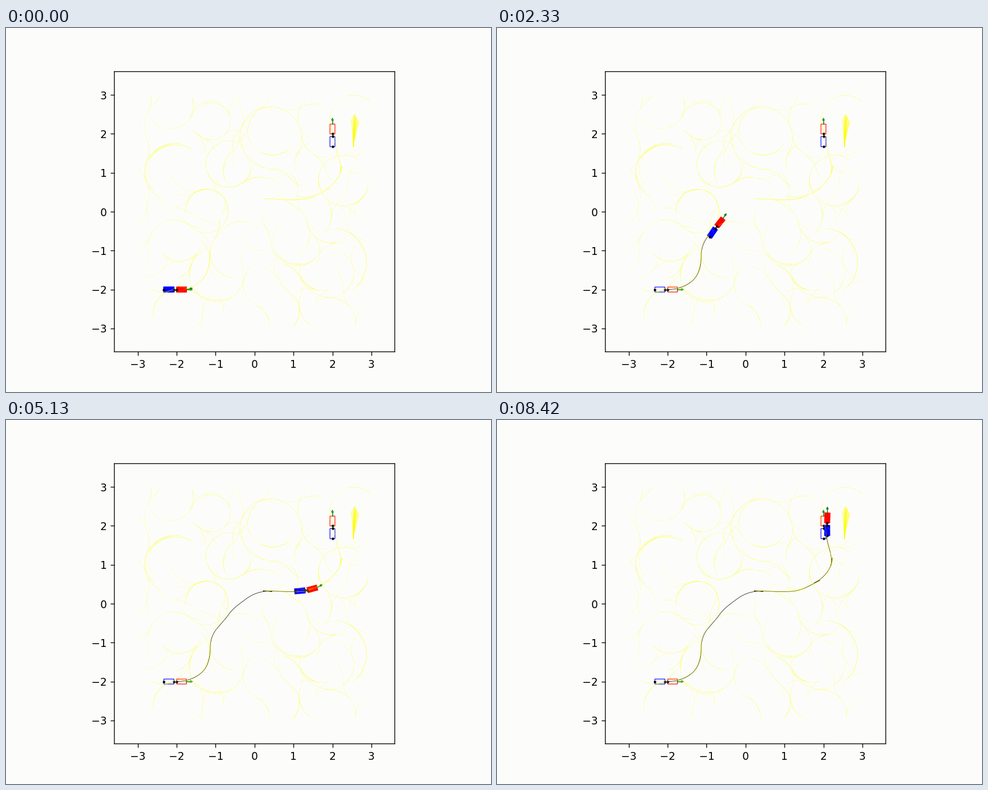
A matplotlib script that plays this animation: 864 by 648 pixels, repeating every 8.46 s.

```python
import numpy as np
import matplotlib.pyplot as plt
from matplotlib.animation import FuncAnimation
from matplotlib.collections import LineCollection

FRAMES, LOOP_MS = 203, 8460
SUB = 8                      # simulation steps per frame
CAR, GAP, TRAILER, HALF = 0.25, 0.07, 0.33, 0.064
BG = "#fcfdfa"

# Rear axle poses along the drive: x, y, heading in degrees
TURN_IN, TURN_OUT = (2.193, 0.985, 78), (2.225, 1.172, 90)
POSES = [
    (-2, -2, 0), (-1.325, -1.735, 47), (-1.137, -1.122, 90),
    (-0.978, -0.653, 50), (-0.661, -0.271, 55), (-0.214, 0.126, 37),
    (0.45, 0.314, -8), (0.22, 0.331, -1), (1.215, 0.321, 5),
    (1.908, 0.602, 27), (1.763, 0.537, 24), TURN_OUT, TURN_IN,
    TURN_OUT, TURN_IN, (2.11, 1.562, 105), (2.095, 2.081, 88),
]


def hermite(a, b, n=400):
    """Curve between two poses, plus its gear (1 forward, -1 reverse)."""
    p, q = np.array(a[:2]), np.array(b[:2])
    ta, tb = (np.array([np.cos(h), np.sin(h)])
              for h in np.radians([a[2], b[2]]))
    gear = 1 if (q - p) @ ta > 0 else -1
    size = gear * np.hypot(*(q - p))
    u = np.linspace(0, 1, n)[:, None]
    c = ((1 + 2 * u) * (1 - u) ** 2 * p + u * (1 - u) ** 2 * size * ta
         + u * u * (3 - 2 * u) * q + u * u * (u - 1) * size * tb)
    return c, gear


def drive():
    """Constant-speed run through all poses, towing the trailer."""
    pts, head, step = [], [], []
    for a, b in zip(POSES, POSES[1:]):
        c, gear = hermite(a, b)
        g = gear * np.gradient(c, axis=0)
        pts.append(c)
        head.append(np.arctan2(g[:, 1], g[:, 0]))
        step.append(gear * np.r_[0, np.hypot(*np.diff(c, axis=0).T)])
    pts, head, step = map(np.concatenate, (pts, head, step))
    dist = np.cumsum(np.abs(step))
    t = np.linspace(0, dist[-1], (FRAMES - 1) * SUB + 1)

    pos = np.column_stack([np.interp(t, dist, pts[:, k]) for k in (0, 1)])
    head = np.interp(t, dist, np.unwrap(head))
    run = np.diff(np.interp(t, dist, np.cumsum(step)), append=0)
    run[-1] = run[-2]
    bend = np.clip(np.gradient(head) * np.sign(run) / t[1], -2.2, 2.2)
    bend = np.convolve(np.pad(bend, 24, mode="edge"), np.ones(49) / 49, "valid")
    tow = np.zeros_like(head)
    for i in range(len(tow) - 1):
        tow[i + 1] = tow[i] + run[i] * np.sin(head[i] - tow[i]) / TRAILER
    return pos, head, tow, np.arctan(CAR * bend)


POS, HEAD, TOW, STEER = drive()


def place(shape, origin, angle):
    c, s = np.cos(angle), np.sin(angle)
    return np.asarray(shape) @ np.array([[c, s], [-s, c]]) + origin


def box(a, b):
    return [(a, -HALF), (b, -HALF), (b, HALF), (a, HALF)]


class Rig:
    """Tractor, trailer, hitch and steering arrow."""

    def __init__(self, ax, solid, z):
        def patch(color, width):
            return ax.fill([0], [0], fc=color if solid else "none", ec=color,
                           lw=width, zorder=z, snap=False)[0]
        width = 0.9 if solid else 0.6
        self.front, self.back = patch("red", width), patch("blue", width)
        self.tip = patch("green", 0.6)
        self.shaft, = ax.plot([], [], color="green", lw=0.8, zorder=z)
        self.bar, = ax.plot([], [], color="black", lw=0.7, zorder=z + 0.1)
        self.dots, = ax.plot([], [], "ko", ms=2, mew=0.3, zorder=z + 0.1)

    def pose(self, at, head, tow, steer=0.0):
        self.front.set_xy(place(box(0, CAR), at, head))
        self.back.set_xy(place(box(-TRAILER, -GAP), at, tow))
        nose = place([(CAR, 0)], at, head)[0]
        aim = head + steer
        self.shaft.set_data(*place([(0, 0), (0.1, 0)], nose, aim).T)
        self.tip.set_xy(place([(0.1, -0.025), (0.155, 0), (0.1, 0.025)],
                              nose, aim))
        joints = place([(-TRAILER, 0), (-GAP, 0), (0, 0)], at, tow)
        self.dots.set_data(*joints.T)
        self.bar.set_data(*joints[1:].T)


# Widest loops of the search tree: centre and radius
LOOPS = [
    (-1.24, 0.02, 0.57), (-0.65, 1.22, 0.6), (-1.1, 2.33, 0.52),
    (0.42, 1.9, 0.78), (2.3, 0.8, 0.65), (1.1, -0.7, 0.65),
    (-0.95, -1.6, 0.7), (-2.05, 1.0, 0.75), (2.0, -1.3, 0.88),
]


def arc(at, head, bend, gear, length=0.5, n=14):
    h = head + gear * bend * np.linspace(0, length, n)
    move = gear * length / (n - 1) * np.column_stack([np.cos(h), np.sin(h)])
    return at + np.cumsum(move, axis=0) - move[0], h


def search_tree(rng, count=300):
    """Loops as trunks; each sample grows an arc from the nearest node."""
    trunks, xy, heads = [], [POS[::60]], [HEAD[::60]]
    for x, y, r in LOOPS:
        for _ in range(3):
            a = rng.uniform(0, 2 * np.pi) + np.linspace(0, rng.uniform(1, 2.5), 40)
            size = r + rng.normal(0, 0.02)
            c = np.column_stack([x + size * np.cos(a), y + size * np.sin(a)])
            trunks.append(c)
            xy.append(c[::6])
            heads.append(a[::6] + np.pi / 2)
    for _ in range(10):
        i = rng.integers(0, len(POS) - 300)
        trunks.append(POS[i:i + 250:5] + rng.normal(0, 0.012, 2))
    xy, heads, twigs = np.concatenate(xy), np.concatenate(heads), []
    for _ in range(count):
        goal = rng.uniform(-3, 3, 2)
        i = np.argmin(np.hypot(*(xy - goal).T))
        options = [arc(xy[i], heads[i], b, g)
                   for b in (-1.6, -0.8, 0, 0.8, 1.6) for g in (1, -1)]
        c, h = min(options, key=lambda o: np.hypot(*(o[0][-1] - goal)))
        inside = np.abs(c).max(axis=1) < 3
        if inside.sum() < 2:
            continue
        twigs.append(c[inside])
        xy = np.vstack([xy, c[inside][3::5]])
        heads = np.r_[heads, h[inside][3::5]]
    return trunks, twigs


def plume(rng, count=22):
    """Dense fan of strands on the right."""
    t = np.linspace(0, 1, 20)
    return [np.column_stack([2.535 + x * t ** 1.3,
                             1.66 + (0.84 - 1.5 * abs(x - 0.03)) * t])
            for x in rng.normal(0.04, 0.045, count)]


plt.rcParams.update({"axes.linewidth": 0.72, "xtick.major.width": 0.72,
                     "ytick.major.width": 0.72})
fig = plt.figure(figsize=(6.4, 4.8), dpi=135, facecolor=BG)
frame = np.array([193.05, 71.55, 499.5, 498.85]) / [864, 648, 864, 648]
ax = fig.add_axes(tuple(frame), facecolor=BG)
for spine in ax.spines.values():
    spine.set_snap(False)


def add_lines(polys, width, alpha):
    ax.add_collection(LineCollection(polys, colors="#ffff00", alpha=alpha,
                                     linewidths=width, zorder=1.5))


rng = np.random.default_rng(7)
trunks, twigs = search_tree(rng)
add_lines(trunks, 0.4, 0.35)
add_lines(twigs, 0.4, 0.25)
add_lines(plume(rng), 0.5, 0.5)

Rig(ax, False, 1).pose((-2, -2), 0, 0)
Rig(ax, False, 1).pose((2, 2), np.pi / 2, np.pi / 2)
rig = Rig(ax, True, 1.3)
trace, = ax.plot([], [], color="#1c1c08", lw=0.42, zorder=1.2)
ax.set(xlim=(-3.6, 3.6), ylim=(-3.6, 3.6),
       xticks=range(-3, 4), yticks=range(-3, 4))


def update(n):
    i = n * SUB
    rig.pose(POS[i], HEAD[i], TOW[i], STEER[i])
    trace.set_data(*POS[:i + 1].T)
    return []


anim = FuncAnimation(fig, update, frames=FRAMES, interval=LOOP_MS / FRAMES,
                     init_func=lambda: update(0), repeat=True, repeat_delay=0)
plt.show()
```
